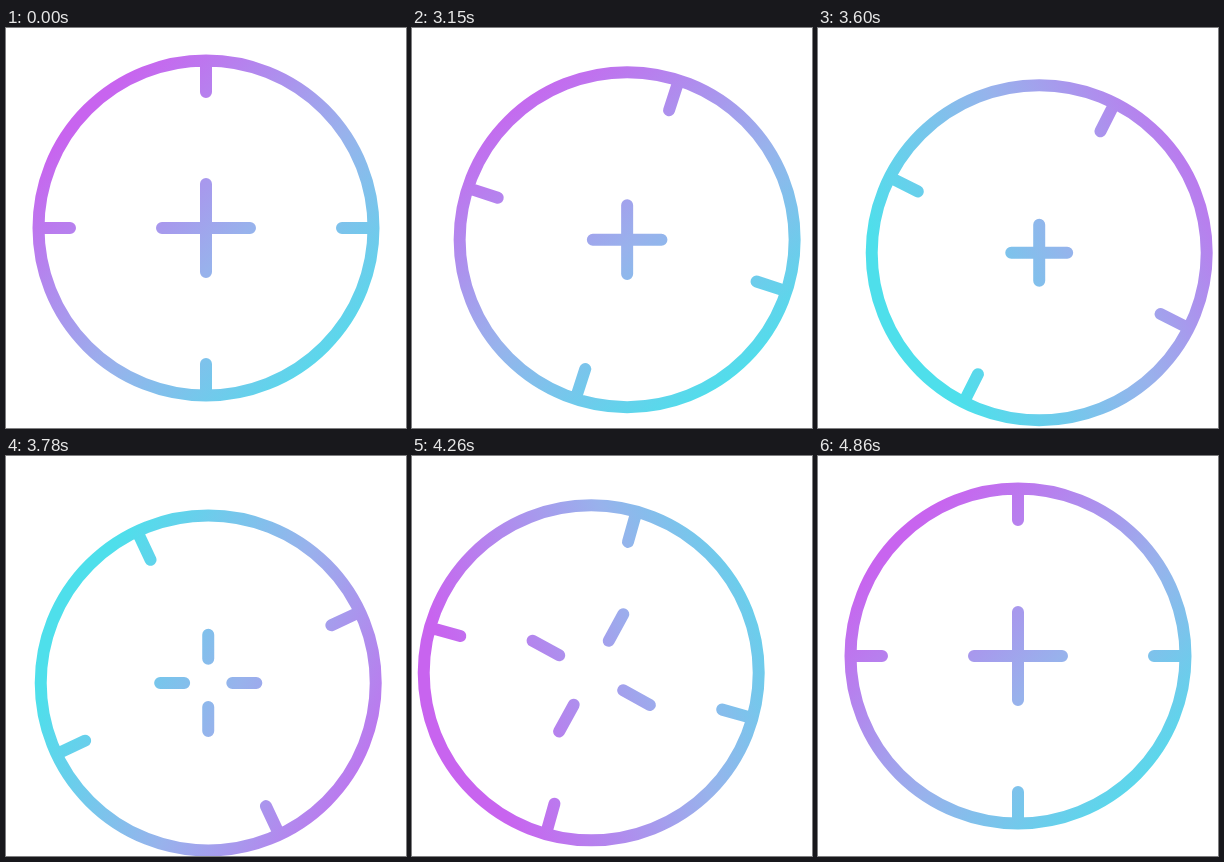
These frames come from a looping animation (400x400 px, 4890 ms). An HTML page with a canvas:

```html
<!DOCTYPE html>
<html lang="en">
<head>
<meta charset="utf-8">
<title>Crosshair</title>
<style>
  html, body { margin: 0; width: 100%; height: 100%; overflow: hidden; background: #fff; }
  canvas { display: block; width: 400px; height: 400px; }
</style>
</head>
<body>
<canvas id="stage"></canvas>
<script>
const LOOP = 4890, STEP = 30, REST = 3000;
const canvas = document.getElementById('stage');
const ctx = canvas.getContext('2d');
const ratio = window.devicePixelRatio || 1;
canvas.width = canvas.height = 400 * ratio;
ctx.scale(ratio, ratio);
ctx.lineWidth = 12;
ctx.lineCap = 'round';

const rad = deg => deg * Math.PI / 180;
const span = (t, from, to) => Math.min(1, Math.max(0, (t - from) / (to - from)));
const smooth = u => u * u * (3 - 2 * u);
const easeOut = (u, power) => 1 - (1 - u) ** power;

const home = [200, 200], right = [222.8, 223.9], left = [175.6, 223.9];

function bezier(u, a, b, c, d) {
  const w = 1 - u;
  return [0, 1].map(i =>
    w * w * w * a[i] + 3 * w * w * u * b[i] + 3 * w * u * u * c[i] + u * u * u * d[i]);
}

// The sight swings right, sags over to the left, then snaps home.
function center(go, swing, back) {
  if (back > 0) return bezier(back, left, [171.5, 219.7], [198, 202.5], home);
  if (swing > 0) return bezier(swing, right, [218, 228], [180, 228], left);
  return bezier(go, home, [208, 208], [226, 216], right);
}

// The gradient turns around a point right of the middle.
function paint(turn) {
  const pivot = [246, 200], c = Math.cos(rad(turn)), s = Math.sin(rad(turn));
  const rotate = (x, y) => [
    pivot[0] + (x - pivot[0]) * c - (y - pivot[1]) * s,
    pivot[1] + (x - pivot[0]) * s + (y - pivot[1]) * c
  ];
  const g = ctx.createLinearGradient(...rotate(83, 83), ...rotate(345, 345));
  g.addColorStop(0, 'rgb(200,100,239)');
  g.addColorStop(0.53, 'rgb(152,178,236)');
  g.addColorStop(1, 'rgb(78,223,235)');
  return g;
}

// Adds four radial lines, a quarter turn apart.
function spokes(x, y, turn, inner, outer) {
  for (let i = 0; i < 4; i++) {
    const a = rad(turn + i * 90), c = Math.cos(a), s = Math.sin(a);
    ctx.moveTo(x + c * inner, y + s * inner);
    ctx.lineTo(x + c * outer, y + s * outer);
  }
}

function draw(t) {
  const go = easeOut(span(t, 6, 366), 1.3);
  const swing = smooth(span(t, 500, 1100));
  const back = smooth(span(t, 1115, 1500));
  const ringBack = smooth(span(t, 1110, 1555));
  const colorTurn = 360 * smooth(easeOut(span(t, 0, 1860), 1.15));

  const [x, y] = center(go, swing, back);
  const ringTurn = 37 * go - 138 * swing + 101 * ringBack;
  const gap = 53.5 * (swing - back);
  const arm = 44 - 20 * (go - back);

  ctx.fillStyle = '#fff';
  ctx.fillRect(0, 0, 400, 400);
  ctx.strokeStyle = paint(colorTurn);
  ctx.beginPath();
  ctx.arc(x, y, 167.5, 0, Math.PI * 2);
  spokes(x, y, ringTurn, 136, 167);
  spokes(x, y, 90 * back, gap, gap + arm);
  ctx.stroke();
}

const start = performance.now();
function tick() {
  const t = (performance.now() - start) % LOOP;
  draw(Math.max(0, Math.floor(t / STEP) * STEP - REST));
  requestAnimationFrame(tick);
}
tick();
</script>
</body>
</html>
```
